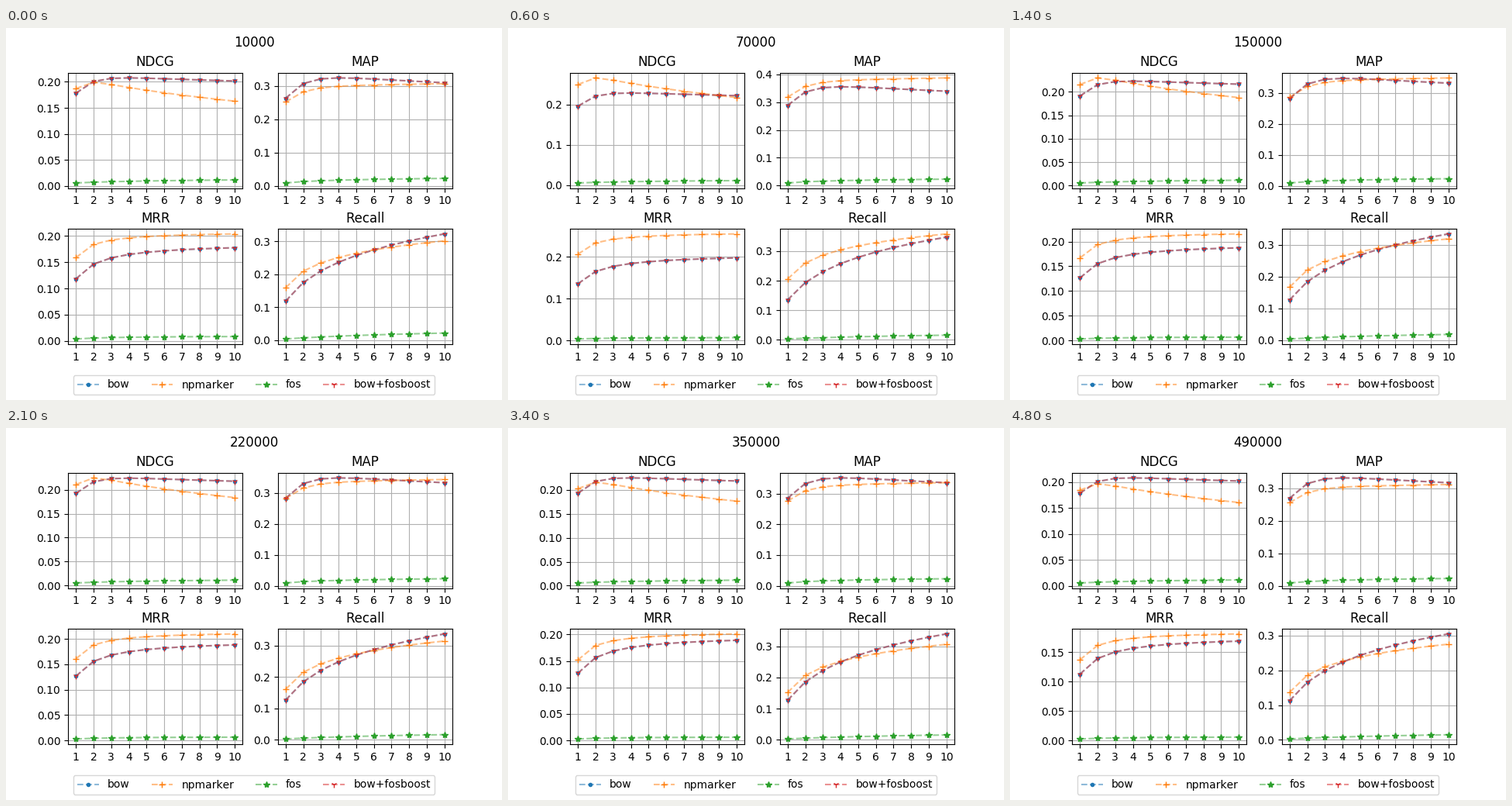
Animation of 640 by 480 pixels, one loop 6300 ms. Source, as a matplotlib script:

```python
import numpy as np
import matplotlib.pyplot as plt
from matplotlib.animation import FuncAnimation

STEPS, HOLD, INTERVAL = 49, 14, 100
KEY_STEPS = [1, 7, 15, 35, 49]
RANKS = np.arange(1, 11)


def trend(step, points):
    """Score in thousandths at a step: one constant, or a value per key step."""
    points = np.broadcast_to(points, len(KEY_STEPS))
    return np.interp(np.sqrt(step), np.sqrt(KEY_STEPS), points) / 1000


def hump(peak, fall, dip, decay):
    """Quick approach to a peak, then a slow fall with rank."""
    shape = 1 - fall * np.sqrt(RANKS) - dip * decay ** (RANKS - 1)
    shape /= shape.max()
    return lambda step: trend(step, peak) * shape


def climb(first, last, offset):
    """Logarithmic climb from the first to the last rank."""
    ramp = np.log((RANKS + offset) / (1 + offset))
    ramp /= ramp[-1]

    def curve(step):
        a, b = trend(step, first), trend(step, last)
        return a + (b - a) * ramp
    return curve


def reciprocal(recall):
    """Mean reciprocal rank: each gain in recall counts 1 / rank."""
    return lambda step: np.cumsum(np.diff(recall(step), prepend=0) / RANKS)


RECALL = [
    climb((118.5, 135.3, 126.7, 127, 112.7), (322, 347, 335, 340, 305), 0.3),
    climb((159, 206, 167, 152, 137), (301, 358, 319.5, 306.5, 275.4), -0.4),
    climb((3.7, 3.3, 3.3, 2.7, 2.5), (21.5, 16, 17.5, 15.5, 14.5), 3),
]
PANELS = {
    "NDCG": [
        hump((207.6, 229, 223, 225.3, 208.4), 0.0277, 0.166, 0.32),
        hump((199.3, 266.6, 230, 216.2, 197), 0.0968, 0.106, 0.13),
        climb(5.6, 11.4, 1),
    ],
    "MAP": [
        hump((324.4, 355.5, 347.5, 351, 332.4), 0.0451, 0.226, 0.38),
        hump((307, 387.5, 349, 335.7, 312), -0.0177, 0.15, 0.35),
        climb(9.4, 23, 0),
    ],
    "MRR": [reciprocal(curve) for curve in RECALL],
    "Recall": RECALL,
}
STYLES = [("bow", "."), ("npmarker", "+"), ("fos", "*"), ("bow+fosboost", "1")]

plt.rcParams.update({"font.family": "DejaVu Sans", "text.kerning_factor": 6})
fig, axes = plt.subplots(2, 2, figsize=(6.4, 4.8), dpi=100)
fig.subplots_adjust(left=0.125, right=0.9, bottom=0.15, top=0.88,
                    wspace=0.2, hspace=0.35)
heading = fig.suptitle("")

plots = []
for ax, (title, curves) in zip(axes.flat, PANELS.items()):
    ax.set_title(title)
    ax.set_xticks(RANKS)
    ax.grid(True)
    lines = []
    for i, (label, marker) in enumerate(STYLES):
        color = f"C{i}"
        lines += ax.plot(RANKS, 0.0 * RANKS, "--", color=(color, 0.5), marker=marker,
                         markerfacecolor=color, markeredgecolor=color, label=label)
    # The boosted series coincides with the plain one.
    plots.append((ax, lines, curves + curves[:1]))
fig.legend(handles=lines, loc="lower center", ncol=4)


def update(frame):
    step = min(frame + 1, STEPS)
    heading.set_text(str(step * 10000))
    for ax, lines, curves in plots:
        for line, curve in zip(lines, curves):
            line.set_ydata(curve(step))
        ax.relim()
        ax.autoscale_view()


anim = FuncAnimation(fig, update, frames=STEPS + HOLD, interval=INTERVAL,
                     init_func=lambda: update(0), repeat=True, repeat_delay=0)
plt.show()
```
